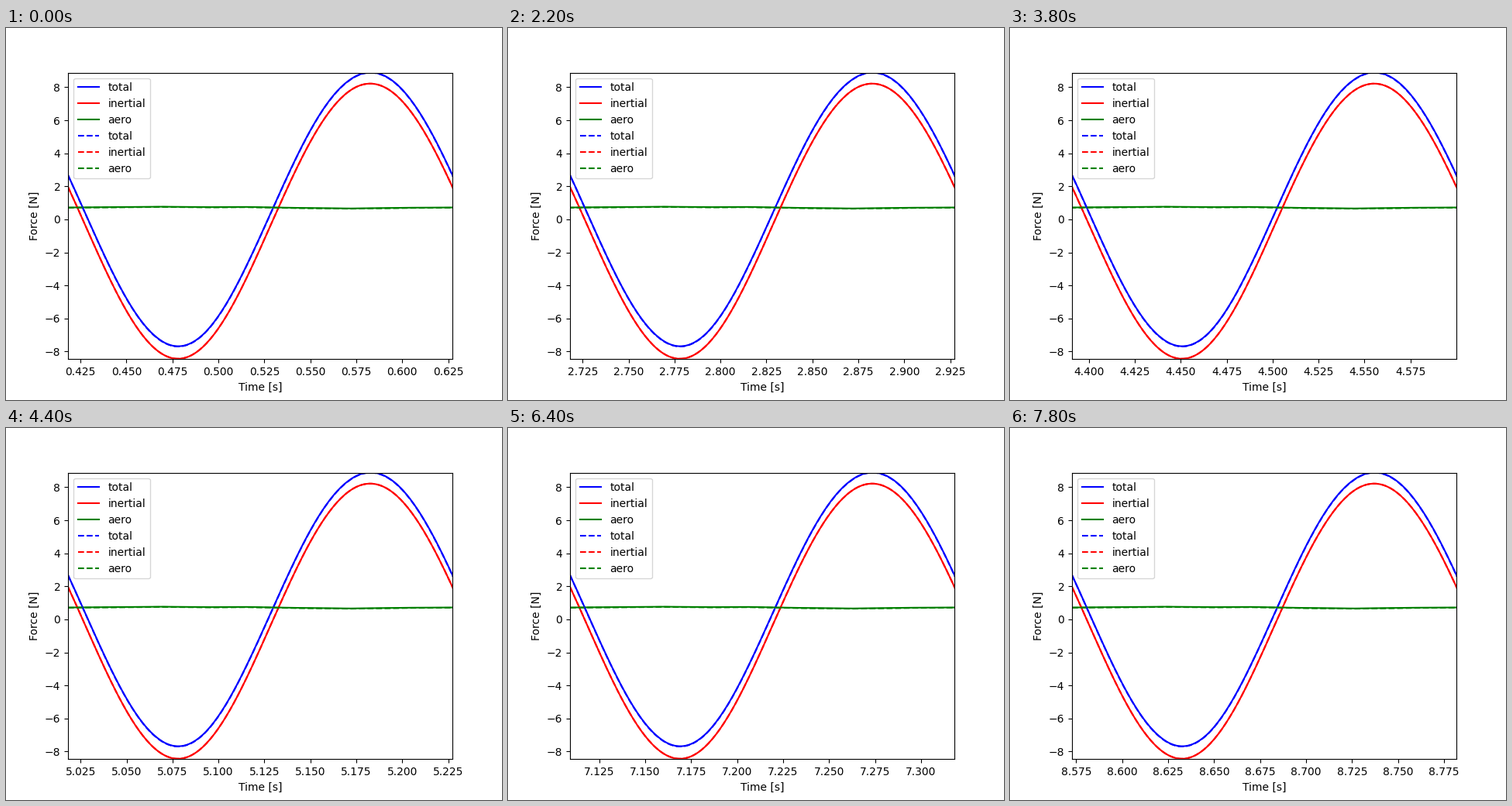
Recreate the animation shown at these times as a matplotlib script. Size 640x480 px, loop 8000 ms.

```python
import numpy as np
import matplotlib.pyplot as plt
from matplotlib.animation import FuncAnimation

PERIOD = 0.20909   # seconds per oscillation, one per step
STEPS = 40
FIRST = 2          # oscillations skipped before the first view

# aerodynamic force over one oscillation
AERO_PHASE = [0, 0.12, 0.23, 0.36, 0.46, 0.57, 0.73, 0.87, 1]
AERO_FORCE = [0.72, 0.745, 0.77, 0.74, 0.755, 0.705, 0.66, 0.705, 0.72]


def aero(t):
    return np.interp(t / PERIOD % 1, AERO_PHASE, AERO_FORCE)


def inertial(t):
    angle = 2 * np.pi * (t / PERIOD - 0.286)
    return -8.33 * np.cos(angle) - 0.11 * np.cos(2 * angle)


def plot_forces(ax, t, style, shift=0.0):
    """Draw the three force curves in one line style."""
    f_aero = aero(t) + shift
    f_inertial = inertial(t)
    ax.plot(t, f_aero + f_inertial, "b" + style, label="total")
    ax.plot(t, f_inertial, "r" + style, label="inertial")
    ax.plot(t, f_aero, "g" + style, label="aero")


fig, ax = plt.subplots(figsize=(6.4, 4.8), dpi=100)
cycles = FIRST + STEPS + 1
time = np.linspace(0, cycles * PERIOD, cycles * 200 + 1)

plot_forces(ax, time, "-")
plot_forces(ax, time, "--", shift=-0.015)
ax.set_xlabel("Time [s]")
ax.set_ylabel("Force [N]")
ax.set_ylim(-8.46, 8.885)
ax.legend(loc="upper left")


def update(step):
    start = (FIRST + step) * PERIOD
    ax.set_xlim(start, start + PERIOD)
    return []


anim = FuncAnimation(fig, update, frames=STEPS, init_func=lambda: update(0),
                     interval=200, repeat=True, repeat_delay=0)
plt.show()
```
